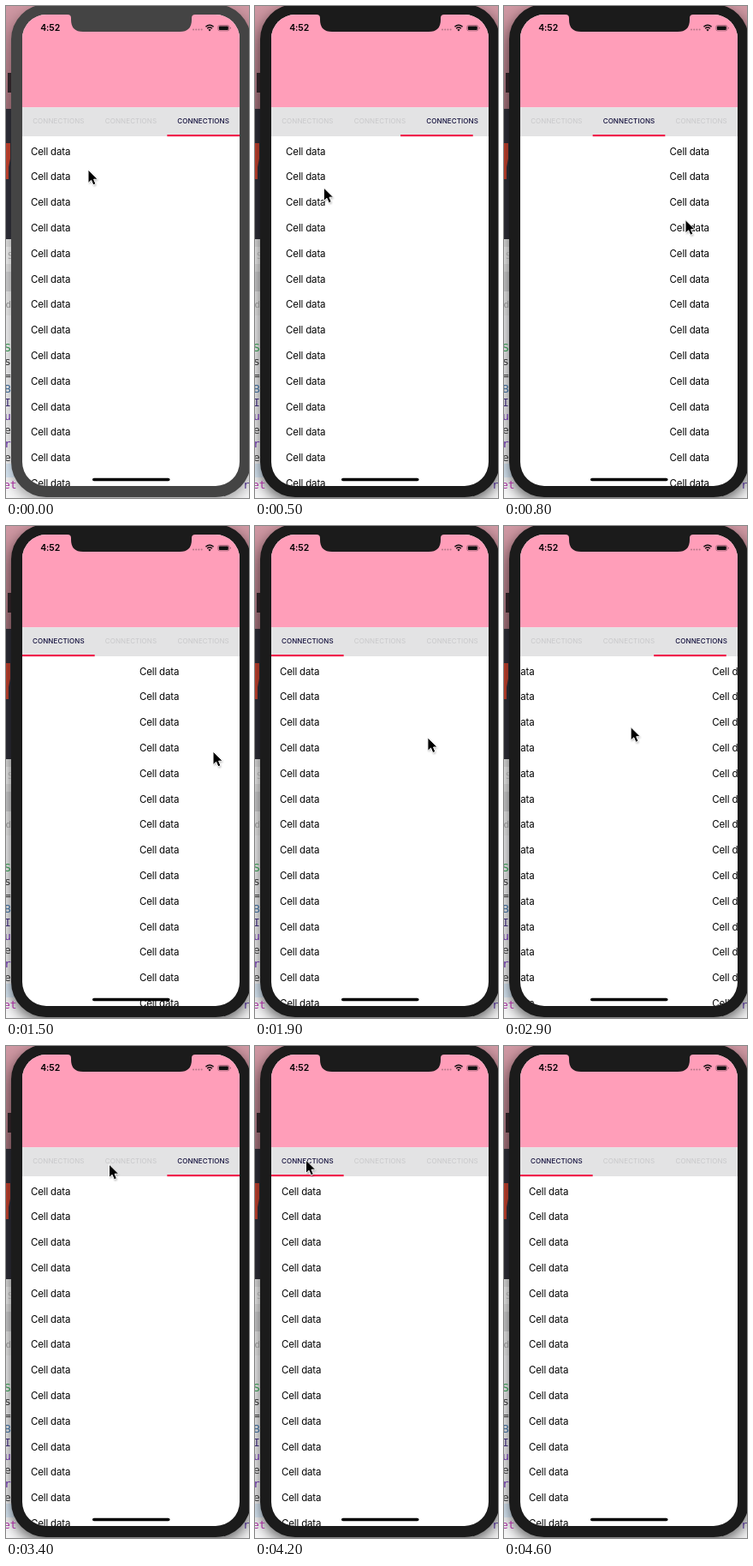
Recreate the animation shown at these times as an HTML page. Size 284 by 574 pixels, loop 4700 ms.

```html
<!DOCTYPE html>
<html lang="en">
<head>
<meta charset="utf-8">
<title>Swipeable tabs</title>
<style>
  html, body { margin: 0; width: 100%; height: 100%; overflow: hidden; background: #f0f0f1; }
  svg { display: block; width: 284px; height: 574px; }
  text { font-family: Inter, "Open Sans", sans-serif; }
  .code text { font: 13px "DejaVu Sans Mono", monospace; }
  .cell { font-size: 11.5px; letter-spacing: -0.16px; fill: #050505; }
  .tab { font-size: 8px; letter-spacing: 0.1px; text-anchor: middle; fill: #c8c8ca; }
  .tab.on { fill: #120f3c; font-weight: 500; }
  .clock { font-size: 10.5px; font-weight: 600; letter-spacing: -0.1px; }
  .bezel { fill: #1b1b1b; }
  .shadow { opacity: .6; }
  .idle .bezel { fill: #444; }
  .idle .shadow { opacity: .35; }
</style>
</head>
<body>
<svg id="stage" viewBox="0 0 284 574" xmlns="http://www.w3.org/2000/svg">
  <defs>
    <linearGradient id="sky" x2="0" y2="1">
      <stop offset="0" stop-color="#cf98a3"/>
      <stop offset="1" stop-color="#a8747e"/>
    </linearGradient>
    <clipPath id="screen"><rect x="19" y="10" width="254" height="550" rx="28"/></clipPath>
    <filter id="wide" x="-20%" y="-20%" width="140%" height="140%">
      <feGaussianBlur stdDeviation="8"/>
    </filter>
    <filter id="soft" x="-50%" y="-50%" width="200%" height="200%">
      <feGaussianBlur stdDeviation="1.2"/>
    </filter>
  </defs>

  <!-- desktop behind the phone -->
  <rect width="284" height="574" fill="#f6f6f7"/>
  <rect width="284" height="120" fill="url(#sky)"/>
  <rect y="78" x="2" width="20" height="23" fill="#37292e"/>
  <rect y="120" width="20" height="152" fill="#30303a"/>
  <path d="M0 160h5v18l-2 10v14h-3z" fill="#c8432f"/>
  <rect y="272" width="20" height="38" fill="#e4e4e4"/>
  <rect y="281" width="20" height="20" fill="#f3f3f3"/>
  <rect y="310" width="20" height="23" fill="#d2d2d3"/>
  <rect y="333" width="20" height="28" fill="#eeeeee"/>
  <rect y="534" width="20" height="16" fill="#dcebf8"/>

  <!-- phone -->
  <rect class="shadow" x="6" y="4" width="280" height="575" rx="41" filter="url(#wide)"/>
  <g class="code" id="code"></g>
  <rect class="bezel" x="6" y="-2" width="280" height="575" rx="41"/>
  <g clip-path="url(#screen)">
    <rect x="19" y="10" width="254" height="550" fill="#fff"/>
    <g id="pages"></g>
    <rect x="19" y="10" width="254" height="108.3" fill="#ff9eb9"/>
    <rect x="19" y="118.3" width="254" height="33.7" fill="#e3e3e4"/>
    <g id="tabs"></g>
    <rect id="bar" y="150" width="84.67" height="2.2" fill="#f0204c"/>
    <rect x="101" y="550.7" width="90.5" height="3.6" rx="1.8"/>
    <path class="bezel" d="M72 9H221V10Q217 10 217 14V16Q217 30 203 30H90Q76 30 76 16V14Q76 10 72 10Z"/>
    <text class="clock" x="40.2" y="28.8">4:52</text>
    <g fill="#b57587" id="dots"></g>
    <path d="M233.4 24.2Q238 20.2 242.6 24.2M235.1 26.3Q238 23.8 240.9 26.3" fill="none" stroke="#111" stroke-width="1.5"/>
    <path d="M236.3 27.6Q238 26.2 239.7 27.6L238 29.4Z" fill="#111"/>
    <rect x="247.8" y="22.5" width="13" height="6.4" rx="1.8" fill="none" stroke="#8d5767" stroke-width=".7"/>
    <rect x="248.8" y="23.5" width="11" height="4.4" rx="1" fill="#111"/>
    <path d="M261.8 24.6v2.2q1-.3 1-1.1t-1-1.1z" fill="#8d5767"/>
  </g>

  <g id="cursor">
    <path d="M1 2V17L4.4 13.8L6.8 19.4L9.6 18.2L7.2 12.8H12Z" opacity=".3" filter="url(#soft)"/>
    <path d="M0 0V15.6L3.6 12.3L5.9 17.8L8.9 16.5L6.6 11.2H11.3Z" stroke="#fff" stroke-linejoin="round"/>
  </g>
</svg>
<script>
  const LOOP = 4700, STEP = 100, PAGE = 254, TAB = PAGE / 3, FOCUS = 300;
  const $ = id => document.getElementById(id);

  function add(parent, tag, attrs, label = "") {
    const el = document.createElementNS("http://www.w3.org/2000/svg", tag);
    for (const name in attrs) el.setAttribute(name, attrs[name]);
    el.textContent = label;
    return parent.appendChild(el);
  }
  const repeat = (count, make) => Array.from({ length: count }, (_, i) => make(i));

  const code = $("code");
  const ink = { S: "#2c8a45", B: "#35608c", I: "#3b2a70", u: "#5c2699", r: "#5c2699" };
  add(code, "text", { x: 2, y: 295, fill: "#999", style: "font-size:10px" }, "S");
  add(code, "text", { x: -7, y: 352, fill: "#888", style: "font-size:11px" }, "ld");
  [..."Ss=BIuere"].forEach((c, i) =>
    add(code, "text", { x: -2, y: 402.5 + 16 * i, fill: ink[c] || "#333" }, c));
  add(code, "text", { x: -3, y: 562.5, fill: "#a32c9c" }, "et");
  add(code, "text", { x: 277, y: 562.5, fill: "#4b2d87" }, "r");

  repeat(4, i => add($("dots"), "circle", { cx: 219 + 3.2 * i, cy: 27.5, r: 1 }));
  const pages = repeat(2, () => {
    const page = add($("pages"), "g", {});
    repeat(14, i => add(page, "text", { class: "cell", x: 29, y: 173.6 + 29.8 * i }, "Cell data"));
    return page;
  });
  const tabs = repeat(3, i =>
    add($("tabs"), "text", { x: 19 + TAB * (i + 0.5), y: 137.2 }, "CONNECTIONS"));

  // Four swipes, then two taps; taps always bring the new page in from the right.
  const moves = [
    { begin: 440, time: 600, dir: -1, tab: -1 },
    { begin: 1200, time: 600, dir: -1, tab: -1 },
    { begin: 2094, time: 600, dir: 1, tab: 1 },
    { begin: 2750, time: 600, dir: 1, tab: 1 },
    { begin: 3500, time: 330, dir: 1, tab: -1 },
    { begin: 3840, time: 380, dir: 1, tab: -1 }
  ];

  // Pointer stops: time, x, y.
  const stops = [[0, 96, 191], [400, 56, 205], [800, 212, 249.5], [1180, 106, 264],
    [1500, 242, 263], [2080, 190, 242], [2400, 46, 236], [2740, 222, 240],
    [3080, 60, 228], [3400, 120.5, 138], [3820, 59.5, 133], [4250, 59.5, 133], [4500, -20, 190]];

  function ease(t, begin, time) {
    const u = Math.min(1, Math.max(0, (t - begin) / time));
    return u * u * (3 - 2 * u);
  }

  function pointerAt(t) {
    const n = stops.findIndex(s => s[0] > t);
    if (n < 0) return stops[stops.length - 1].slice(1);
    const [t0, x0, y0] = stops[n - 1], [t1, x1, y1] = stops[n];
    const u = ease(t, t0, t1 - t0);
    return [x0 + (x1 - x0) * u, y0 + (y1 - y0) * u];
  }

  function draw(t) {
    let turn = moves.length, tab = 2;
    for (const m of moves) {
      turn += m.dir * ease(t, m.begin, m.time);
      tab += m.tab * ease(t, m.begin, 200);
    }
    const shift = turn % 1 * PAGE, [x, y] = pointerAt(t);
    pages.forEach((p, i) => p.setAttribute("transform", `translate(${i * PAGE - shift} 0)`));
    tabs.forEach((el, i) => el.setAttribute("class", i === Math.round(tab) ? "tab on" : "tab"));
    $("bar").setAttribute("x", 19 + TAB * tab);
    $("cursor").setAttribute("transform", `translate(${x} ${y})`);
    $("stage").setAttribute("class", t < FOCUS ? "idle" : "");
  }

  const start = performance.now();
  function tick() {
    const t = (performance.now() - start) % LOOP;
    draw(Math.floor(t / STEP) * STEP);
    requestAnimationFrame(tick);
  }
  draw(0);
  requestAnimationFrame(tick);
</script>
</body>
</html>
```
